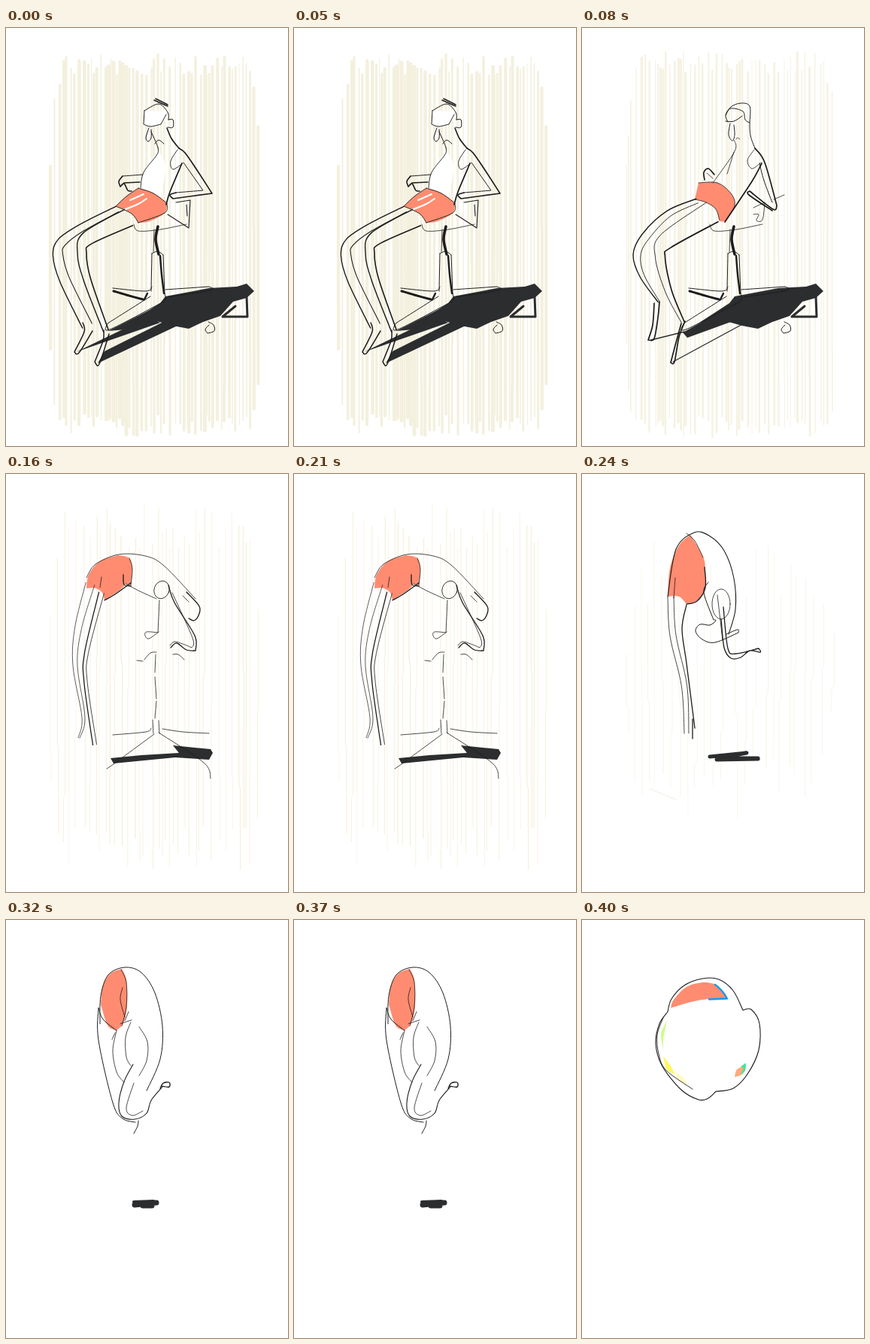
Recreate the animation shown at these times as an HTML page. Size 375 by 556 pixels, loop 480 ms.

```html
<!DOCTYPE html>
<html lang="en">
<head>
<meta charset="utf-8">
<title>Office chair flip</title>
<style>
html, body { margin: 0; width: 100%; height: 100%; overflow: hidden; background: #fff; }
svg { display: block; width: 100%; height: 100%; }
svg > g { visibility: hidden; }
path, ellipse { stroke-linecap: round; stroke-linejoin: round; }
</style>
</head>
<body>
<svg id="stage" viewBox="0 0 375 556"></svg>
<script>
const STEP = 80;
const INK = '#1c1c1c', SHADE = '#2b2d2f', SHORTS = '#ff8c70';
const stage = document.getElementById('stage');
const poses = [];
let layer;

function add(tag, attrs) {
  const el = document.createElementNS('http://www.w3.org/2000/svg', tag);
  for (const k in attrs) el.setAttribute(k, attrs[k]);
  layer.appendChild(el);
  return el;
}
function pose(draw) {
  layer = stage;
  layer = add('g', {});
  poses.push(layer);
  draw();
}

const points = text => text.trim().split(/\s+/).map(p => p.split(',').map(Number));

function smooth(pts) {
  let d = 'M' + pts[0];
  for (let i = 0; i < pts.length - 1; i++) {
    const a = pts[i - 1] || pts[i], b = pts[i], c = pts[i + 1], e = pts[i + 2] || c;
    d += `C${b.map((v, k) => v + (c[k] - a[k]) / 6)} ${c.map((v, k) => v - (e[k] - b[k]) / 6)} ${c}`;
  }
  return d;
}
// Smooth curve through points; "|" makes a corner.
function curve(text) {
  const parts = text.split('|').map(points);
  return parts.map((p, i) => {
    if (!i) return smooth(p);
    return smooth([parts[i - 1].at(-1), ...p]).replace(/^M[^C]*/, '');
  }).join('');
}

const line = (w, color, d) => add('path', { d, fill: 'none', stroke: color, 'stroke-width': w });
const ink = (w, ...list) => list.forEach(t => line(w, INK, curve(t)));
const blob = (fill, t) => add('path', { d: curve(t) + 'Z', fill });
const shape = (fill, t) => add('path', { d: 'M' + points(t).join('L') + 'Z', fill });
const oval = (w, cx, cy, rx, ry, tilt = 0) => add('ellipse', {
  cx, cy, rx, ry, fill: 'none', stroke: INK, 'stroke-width': w,
  transform: `rotate(${tilt} ${cx} ${cy})`
});

// Two outlines at either side of a centre line; width runs a -> m -> b.
function limb(w1, w2, text, a, m, b) {
  const c = points(text), n = c.length - 1;
  [[w1, 1], [w2, -1]].forEach(([w, side]) => {
    const edge = c.map(([x, y], i) => {
      const p = c[Math.max(0, i - 1)], q = c[Math.min(n, i + 1)], t = 2 * i / n;
      const half = side * (t < 1 ? a + (m - a) * t : m + (b - m) * (t - 1)) / 2;
      const len = Math.hypot(q[0] - p[0], q[1] - p[1]);
      return [x + (q[1] - p[1]) / len * half, y - (q[0] - p[0]) / len * half];
    });
    line(w, INK, smooth(edge));
  });
}

// Hand-ruled wallpaper: uneven bands, ragged ends, shorter at both sides.
function wallpaper({ seed, gap, thin, thick, color, top, end, ragged, kink }) {
  const r = () => (seed = seed * 16807 % 2147483647) / 2147483647;
  for (let x = 59; x < 338; x += gap * (.5 + r())) {
    const cut = 150 * Math.exp(-Math.min(x - 59, 338 - x) / 5);
    const y1 = top + cut + r() * ragged, y2 = end - cut * .7 - r() * ragged;
    const bend = y1 + (y2 - y1) * (.4 + r() * .5), sway = (r() - .5) * kink;
    line(thin + r() * (thick - thin), color, `M${x},${y1}V${bend}l${sway},6V${y2}`);
  }
}

// Shared furniture of the two seated poses.
function chair() {
  ink(1, '194,300 193,350', '209,302 211,353', '194,300 202,297 209,302',
    '142,346 186,350 194,344', '212,348 270,344|272,349 215,358',
    '192,357 135,393|138,401 204,367', '211,353 212,362 204,367');
  ink(3, '143,350 160,355 182,361');
  ink(2.4, '184,361 188,353', '205,303 207,328 210,353');
  ink(3.6, '202,264 199,281 203,301');
  ink(.8, '170,261 176,270 205,268 240,261', '197,268 196,298');
  ink(1, '269,391 276,395 277,403 268,406|265,401 270,395');
}
function shadow(dx) {
  const t = add('g', { transform: `translate(${dx})` }), old = layer;
  layer = t;
  shape(SHADE, '165,392 205,366 212,357 270,346 307,344 320,340 330,350 320,359 302,364 285,383 262,391 243,400 222,396 190,387');
  line(3, SHADE, 'M320,357L321,384L288,384L305,370');
  layer = old;
}

pose(() => {
  wallpaper({ seed: 71, gap: 5.2, thin: 1, thick: 5, color: '#f3f0de', top: 34, end: 542, ragged: 30, kink: 1 });
  shadow(0);
  shape(SHADE, '136,403 205,368 215,385 160,401');
  shape(SHADE, '93,431 190,384 205,392');
  shape(SHADE, '122,446 131,430 215,388 228,396');
  chair();
  ink(1.1, '226,232 245,229|243,266|215,248', '240,235 241,250');

  blob('#fff', '203,162 183,191 178,213|206,224|212,185 204,165');
  shape('#fff', '184,111 212,109 213,118 206,127 192,131 183,127');
  blob(SHORTS, '176,213 195,219 214,233|211,246 191,257 176,259|167,247 146,237|160,224 176,213');
  line(2, '#fff', curve('183,221 165,229') + curve('187,227 176,234 154,243'));

  ink(1, '184,110 203,101 215,112 216,122', '184,110 183,128|192,131 206,128|213,115',
    '190,133 186,146 189,151 193,146 193,135', '193,138 199,151 202,159',
    '198,154 203,149 210,154', '216,122 222,122 222,132 215,132');
  ink(1.6, '197,96 215,104', '199,94 215,102', '214,133 220,147 230,160');
  ink(.9, '202,159 201,168 183,192 179,213', '228,162 219,177 222,188 235,180',
    '176,213 196,220 214,233|211,246 176,259', '176,213 160,224 146,237|167,247 176,259');
  ink(1.7, '230,160 238,166 252,186 274,220|222,227|218,222 226,219', '234,180 218,218 213,235');
  ink(1, '236,179 262,216|226,219', '182,195 155,197');
  ink(1.6, '155,197 150,204 152,211|157,207 162,216 167,217', '157,206 178,205');

  limb(1.1, 1.4, '148,241 100,266 74,285 69,302 78,335 108,396', 8, 13, 14);
  ink(1.5, '102,392 104,404 91,431|97,432 115,403');
  limb(1.6, 1.4, '163,252 108,280 101,300 108,335 133,403', 24, 12, 7);
  ink(1.5, '130,402 129,416 118,444|124,447 137,407');
});

pose(() => {
  wallpaper({ seed: 233, gap: 5.6, thin: .8, thick: 3.4, color: '#f5f2e2', top: 32, end: 545, ragged: 30, kink: 1 });
  shadow(-9);
  shape(SHADE, '134,405 190,374 206,388 140,412');
  line(1.4, SHADE, 'M121,444L217,392M92,415L136,404');
  chair();
  ink(.8, '255,228 269,222', '228,239 243,232|240,255 232,256 235,248 228,248');

  blob(SHORTS, '155,206 180,206 198,220 203,236 191,257|183,256 178,241 165,232 150,228|155,206');
  ink(1, '194,125 191,116 198,105 211,100 223,104 223,126|217,122 214,111 198,107 191,116',
    '191,124 202,124 213,117', '223,126 224,143 230,160', '197,127 195,142 200,150 203,142 202,129');
  ink(.8, '205,148 207,146 210,148', '202,149 203,164 174,206', '202,165 193,194',
    '229,162 220,176 226,187 238,179', '155,206 180,206 198,220 203,236 191,257',
    '150,228 165,232 178,241 183,256', '166,193 174,200');
  ink(1.7, '230,160 243,179 259,236|254,241 223,217|222,222 253,243', '239,180 226,204 190,258',
    '176,195 168,187 162,192 163,202');
  ink(1, '236,180 242,203 253,232');

  limb(.9, 1.4, '153,230 115,247 84,278 73,302 80,330 102,364', 6, 12, 2);
  ink(1.7, '103,364 101,385 96,413 88,415|94,395 96,366');
  limb(1.7, .9, '173,245 111,284 104,305 115,350 134,391', 30, 13, 4);
  ink(1.7, '137,390 129,411 123,444 118,445|124,422 132,393');
});

pose(() => {
  wallpaper({ seed: 17, gap: 7.6, thin: .6, thick: 1.3, color: '#f5efd9', top: 40, end: 527, ragged: 60, kink: 4 });
  shape(SHADE, '139,378 180,374 230,371 222,361 272,366 275,371 270,380 225,377 143,385');
  blob(SHORTS, '107,152 110,134 125,116 149,108|164,112 168,126 166,148|159,146 156,134|157,149 131,168|128,158 119,152 107,152');
  ink(.8, '107,138 119,120 150,107 185,109 210,122 252,166', '159,146 178,156 200,166',
    '164,112 168,126 166,148', '127,137 125,151', '235,162 243,170');
  oval(.8, 207, 154, 10, 12, 20);
  ink(1.3, '240,157 257,176 256,188 250,195 243,192', '156,134 157,147 166,149', '166,145 145,160 131,168');
  ink(1.3, '216,148 224,171 251,215 252,235|240,234 227,225 219,231');
  ink(.8, '221,158 248,218 247,231|235,226 224,223 218,228');
  limb(.7, .7, '112,146 96,205 92,255 103,324 97,351', 12, 6, 2);
  limb(.8, 1.3, '127,158 107,238 106,277 118,360', 7, 4, 5);

  ink(.8, '204,168 202,211|187,210 185,215 190,219 203,210', '174,248 182,249', '184,247 192,238 200,237',
    '199,240 198,264', '198,270 200,299', '200,302 198,325', '195,327 196,345', '203,328 204,345',
    '142,347 186,343 193,338', '208,339 235,343 270,345', '197,346 155,377', '149,382 134,392',
    '203,344 263,384 272,405', '222,240 229,240 237,247');
});

pose(() => {
  wallpaper({ seed: 39, gap: 11, thin: .6, thick: 1, color: '#f7f4e4', top: 90, end: 460, ragged: 85, kink: 8 });
  line(.8, '#eee9dc', 'M90,419L125,433');
  line(5, SHADE, 'M170,376L219,371L180,378L234,378');
  line(5, SHADE, 'M179,380L234,379');
  blob(SHORTS, '114,163 117,125 129,95 144,81|161,110 164,130 163,153 152,169 139,173|129,163 114,163');
  ink(1.1, '114,163 125,100 149,78 169,82 189,102 202,139 204,180 195,213');
  ink(.8, '124,138 122,165', '139,79 150,89 161,111');
  limb(.8, .8, '118,163 121,215 136,282 139,345', 8, 8, 6);
  oval(.8, 185, 173, 12, 20);
  ink(1.3, '139,174 133,206 139,252 150,338', '139,173 153,169 164,151 163,124', '147,326 147,352');
  ink(1, '168,144 162,158 175,194|178,195 170,201 157,200 151,209 160,220 177,224 208,211|207,207 192,213');
  ink(1.3, '188,177 194,232 205,239 235,232|237,237 223,235 211,244 198,245 189,231 185,193');
  ink(.8, '180,161 187,221');
});

pose(() => {
  line(7, SHADE, 'M171,379L200,376M182,380L194,380');
  line(4, SHADE, 'M170,375L196,374');
  blob(SHORTS, '126,112 129,87 139,71 154,65|160,80 161,114 156,137 147,147|135,140 126,112');
  ink(1, '125,138 126,101 136,73 158,63 180,70 198,97 208,141 205,185 187,227',
    '123,117 129,132 147,147', '123,117 123,160 142,243 155,264 172,269', '176,267 175,274 170,284');
  ink(.8, '153,66 160,83 160,115 154,141', '155,90 152,106 158,129', '163,122 158,134',
    '152,138 167,133', '145,150 141,159', '147,147 142,174 147,202 157,216',
    '166,136 159,156 160,182 166,194', '177,142 188,162 187,187 177,207', '170,217 160,250 168,260 182,254');
  ink(1.1, '169,192 157,215 150,243 154,261 171,265 187,257 193,240 208,222');
  ink(1.4, '207,221 217,222 217,216 209,217 205,224');
});

pose(() => {
  blob(SHORTS, '118,117 122,106 139,89 161,83 177,85|193,104|168,105 145,109 118,117');
  line(2.4, '#149be8', 'M177,86Q186,92 193,104.5L169,105.5');
  blob('#cdfc8c', '113,134 105,152 109,175|108,160 113,134');
  blob('#fff85c', '108,181 115,190 124,205|113,199 108,181');
  blob('#fffbc0', '123,202 133,208 142,220|129,212 123,202');
  blob('#ffab78', '203,209 206,199 216,194|213,205 203,209');
  blob('#40e59b', '211,195 218,190|217,200 211,207|215,197');
  ink(1.1, '114,122 119,105 136,87 160,78 182,79 201,94 214,120|225,119 236,138 235,173 220,205 201,224 178,228|168,237 155,239 131,225 106,193 98,164 103,138 114,122');
  ink(.9, '108,130 100,153 102,178 112,200 147,225');
});

function show() {
  const k = Math.floor((performance.now() - start) / STEP) % poses.length;
  poses.forEach((g, i) => g.style.visibility = i === k ? 'visible' : 'hidden');
  requestAnimationFrame(show);
}
const start = performance.now();
show();
</script>
</body>
</html>
```
